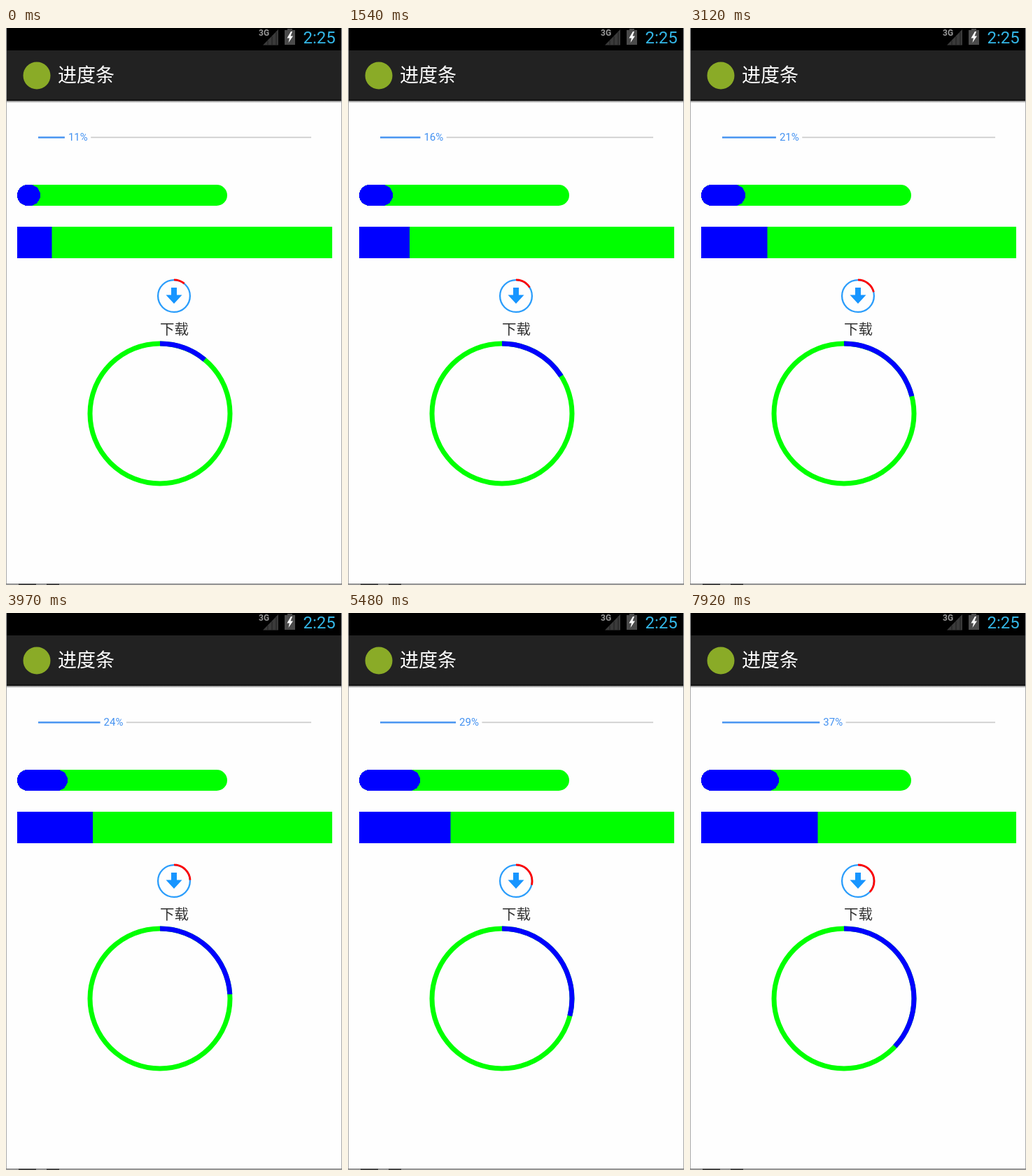
An HTML page for the animation above (8000 ms loop, 480x796 px).

```html
<!DOCTYPE html>
<html lang="zh">
<head>
<meta charset="utf-8">
<title>进度条</title>
<style>
html, body { margin: 0; width: 100%; height: 100%; overflow: hidden; background: #fefefe; }
svg { display: block; }
text { font-family: Roboto, "Noto Sans CJK SC", "Noto Sans CJK", sans-serif; }
</style>
</head>
<body>
<svg width="480" height="796" viewBox="0 0 480 796">
  <defs>
    <linearGradient id="shade" x2="0" y2="1">
      <stop offset="0" stop-color="#777"/>
      <stop offset="1" stop-color="#fefefe"/>
    </linearGradient>
  </defs>

  <!-- window frame -->
  <path d="M.5 0V796M479.5 0V796" stroke="#aaa"/>
  <path d="M0 794.5H480" stroke="#777"/>
  <path d="M0 795.5H480" stroke="#aaa"/>
  <path d="M18 795H43M58 795H76" stroke="#444" stroke-width="2"/>

  <!-- status bar -->
  <rect x="1" width="478" height="32"/>
  <path d="M367 24.5L389 2V24.5Z" fill="#3a3a3a"/>
  <path d="M374 24V18M380 24V12M386 24V6" stroke="#292929" stroke-width="1.5"/>
  <text x="361" y="11" font-size="12" font-weight="700" fill="#999">3G</text>
  <path d="M402 1H409V3H413V24H398V3H402Z" fill="#4b4b4b"/>
  <path d="M407 5L401.500 14.500H405L403.500 21L410 11.500H406.500L409 5Z" fill="#fff"/>
  <text x="424.500" y="22" font-size="24" fill="#33b5e5">2:25</text>

  <!-- action bar -->
  <rect x="1" y="32" width="478" height="71" fill="#222"/>
  <rect x="1" y="102" width="478" height="2" fill="#151515"/>
  <rect x="1" y="104" width="478" height="3" fill="url(#shade)"/>
  <circle cx="44" cy="68" r="19.500" fill="#8aab27"/>
  <text x="74" y="77" font-size="27" fill="#fff">进度条</text>

  <!-- line with percentage -->
  <rect id="reached" x="46" y="155.200" height="2.400" fill="#4291f1"/>
  <rect id="rest" y="155.500" height="1.700" fill="#ccc"/>
  <text id="label" y="161" font-size="15" fill="#4291f1"></text>

  <!-- bars -->
  <rect x="16" y="224" width="300" height="30" rx="15" fill="#0f0"/>
  <rect id="pill" x="16" y="224" height="30" rx="15" fill="#00f" shape-rendering="crispEdges"/>
  <rect x="16" y="284" width="450" height="45" fill="#0f0"/>
  <rect id="block" x="16" y="284" height="45" fill="#00f"/>

  <!-- download button -->
  <g fill="none">
    <circle cx="240" cy="383" r="22.900" stroke="#2b9dfb" stroke-width="2.300"/>
    <circle class="arc" cx="240" cy="383" r="23.100" stroke="#f00" stroke-width="2.800" pathLength="100" transform="rotate(-90 240 383)"/>
  </g>
  <path d="M236 371H244V381.500H251.500L240 394L228.500 381.500H236Z" fill="#1795ff"/>
  <text x="240.500" y="438" font-size="20.500" text-anchor="middle" fill="#333">下载</text>

  <!-- ring -->
  <g fill="none" stroke-width="7">
    <circle cx="220" cy="551" r="100" stroke="#0f0"/>
    <circle class="arc" cx="220" cy="551" r="100" stroke="#00f" pathLength="100" transform="rotate(-90 220 551)"/>
  </g>
</svg>
<script>
const LOOP = 8000, START = 11;
// moments at which the progress grows by one percent
const ticks = [400, 670, 950, 1230, 1540, 1940, 2190, 2440, 2850, 3120, 3370, 3660, 3970,
  4390, 4670, 4920, 5230, 5480, 5880, 6160, 6450, 6710, 7080, 7390, 7640, 7920];
const $ = id => document.getElementById(id);
const arcs = document.querySelectorAll('.arc');

function show(p) {
  const textX = 46 + 3.9 * p, restX = textX + 32.3;
  $('reached').setAttribute('width', textX - 5 - 46);
  $('label').setAttribute('x', textX);
  $('label').textContent = p + '%';
  $('rest').setAttribute('x', restX);
  $('rest').setAttribute('width', 436 - restX);
  $('pill').setAttribute('width', 3 * p);
  $('block').setAttribute('width', 4.5 * p);
  arcs.forEach(arc => arc.setAttribute('stroke-dasharray', p + ' 100'));
}

const begin = performance.now();
function frame() {
  const t = (performance.now() - begin) % LOOP;
  show(START + ticks.filter(tick => tick <= t).length);
  requestAnimationFrame(frame);
}
frame();
</script>
</body>
</html>
```
